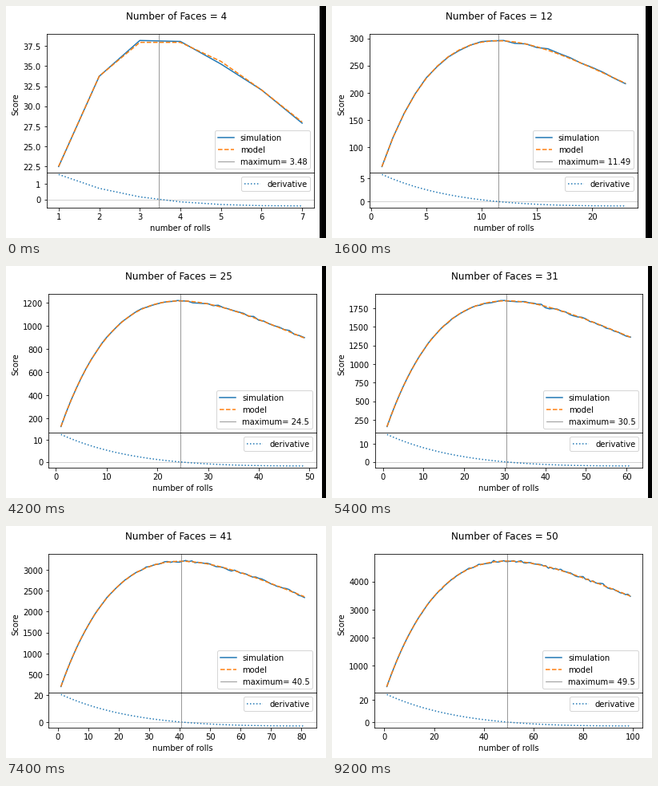
These frames come from a looping animation (400 px wide and 291 px high, 9400 ms). A matplotlib script:

```python
import numpy as np
import matplotlib.pyplot as plt
from matplotlib.animation import FuncAnimation
from matplotlib.patches import Rectangle

W, H, DPI = 400, 291, 72
FIRST, LAST = 4, 50
ROUNDS = 10
SAMPLES = 100_000
PAD = 7.2                     # margin around the drawing, px
AX_W, AX_H = 334.8, 217.44    # both panels together, px
LOW_H = AX_H / 5
TITLE_X, TITLE_Y = 162, 246.24    # title's top centre from the panels' corner

fig = plt.figure(figsize=(W / DPI, H / DPI), dpi=DPI, facecolor="white")


def curves(faces):
    """Rolls, expected score, simulated score, slope and best roll count."""
    n = np.arange(1, 2 * faces)
    keep = 1 - 1 / faces
    mean = (faces + 2) / 2
    alive = keep ** n
    model = ROUNDS * mean * n * alive
    slope = mean * alive * (1 + n * np.log(keep))

    rng = np.random.default_rng(faces)
    spread = np.sqrt((1 - alive) / alive / SAMPLES)
    sim = model * (1 + spread * rng.normal(size=n.size))
    return n, model, sim, slope, -1 / np.log(keep)


def place(top, low, x, y):
    low.set_position([x / W, y / H, AX_W / W, LOW_H / H])
    top.set_position([x / W, (y + LOW_H) / H, AX_W / W, (AX_H - LOW_H) / H])


def page_width(faces):
    """The white page only ever grows as wider charts come up."""
    if faces < 23:
        return 392
    return 395 if faces < 34 else W


def draw(i):
    faces = FIRST + i
    n, model, sim, slope, best = curves(faces)
    fig.clear()
    top = fig.add_axes([0.1, 0.3, 0.8, 0.6])
    low = fig.add_axes([0.1, 0.1, 0.8, 0.2])
    x, y = 54, 36
    place(top, low, x, y)

    top.plot(n, sim, label="simulation")
    top.plot(n, model, "--", label="model")
    top.axvline(best, color="gray", lw=0.8, label=f"maximum= {round(best, 2)}")
    top.set_ylabel("Score")
    top.tick_params(bottom=False, labelbottom=False)
    top.legend(loc="lower right")

    low.axhline(0, color="lightgray", lw=1)
    low.plot(n, slope, ":", label="derivative")
    low.axvline(best, color="gray", lw=0.8)
    low.set_xlabel("number of rolls")
    low.legend(loc="upper right")

    # Shift the chart so its labels sit one margin from the left and bottom.
    x += PAD - top.get_tightbbox().x0
    y += PAD - low.get_tightbbox().y0
    place(top, low, x, y)
    fig.suptitle(f"Number of Faces = {faces}",
                 x=(x + TITLE_X) / W, y=(y + TITLE_Y) / H, va="top")

    # Text is measured down from the page's unrounded height.
    fig.canvas.get_renderer().height = y + TITLE_Y + PAD

    edge = page_width(faces)
    if edge < W:
        fig.add_artist(Rectangle((edge / W, 0), 1 - edge / W, 1, lw=0,
                                 color="black", transform=fig.transFigure))
    return []


anim = FuncAnimation(fig, draw, frames=LAST - FIRST + 1, interval=200,
                     init_func=lambda: [], repeat=True, repeat_delay=0)
plt.show()
```
